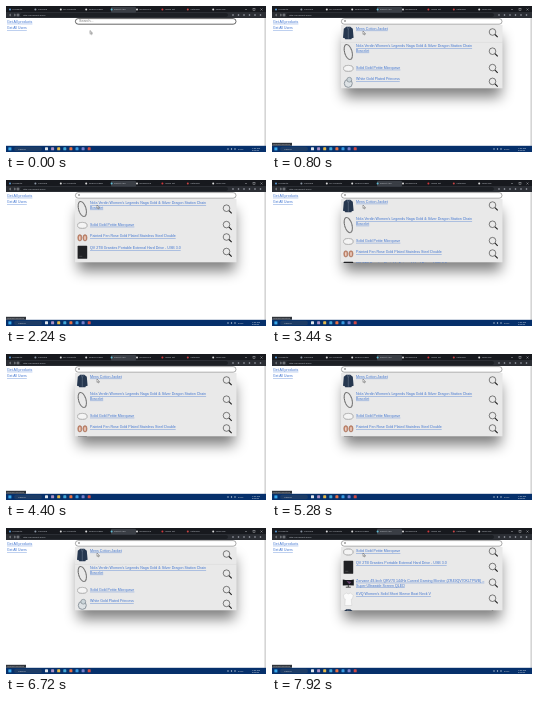
An HTML page that plays this animation: 260 by 146 pixels, repeating every 8000 ms.

```html
<!DOCTYPE html>
<html lang="en">
<head>
<meta charset="utf-8">
<title>Product search</title>
<style>
html, body { margin: 0; width: 100%; height: 100%; overflow: hidden; background: #fff; }
svg { display: block; width: 100vw; height: 100vh; }
text { font-family: "Liberation Sans", Arial, sans-serif; font-size: 3.6px; }
.link { fill: #3f74d0; text-decoration: underline; text-decoration-thickness: .3px; }
.tiny { font-size: 2.5px; fill: #b9bdc4; }
.timed { animation: 8s step-end infinite; }
.open { animation-name: open; }
#field { animation-name: field; }
#hint { animation-name: hint; }
#listA { animation-name: listA; }
#listB { animation-name: listB; }
#listC { animation-name: listC; }
#scroll { animation: scroll 8s ease-in-out infinite; }
#cursor { animation: cursor 8s ease-in-out infinite; }
@keyframes open { 0% { visibility: hidden } 3%, 100% { visibility: visible } }
@keyframes field { 0% { stroke: #333; stroke-width: .75px } 3%, 100% { stroke: #555; stroke-width: .5px } }
@keyframes hint { 0% { opacity: 1 } 3%, 100% { opacity: 0 } }
@keyframes listA { 0% { opacity: 1 } 19% { opacity: 0 } 81% { opacity: 1 } 90%, 100% { opacity: 0 } }
@keyframes listB { 0% { opacity: 0 } 19% { opacity: 1 } 81%, 100% { opacity: 0 } }
@keyframes listC { 0% { opacity: 0 } 90%, 100% { opacity: 1 } }
@keyframes scroll {
  0%, 20% { transform: translateY(0) }
  26%, 38% { transform: translateY(-17px) }
  44%, 100% { transform: translateY(0) }
}
@keyframes cursor {
  0%, 1% { transform: translate(84px, 24.5px) }
  5%, 100% { transform: translate(91px, 25px) }
}
</style>
</head>
<body>
<svg viewBox="0 0 260 146" preserveAspectRatio="none">
  <defs>
    <filter id="blur" x="-30%" y="-60%" width="160%" height="220%"><feGaussianBlur stdDeviation="7"/></filter>
    <clipPath id="window"><rect x="69" y="19" width="161.5" height="63.3"/></clipPath>
    <g id="lens" fill="none" stroke="#202020">
      <circle cx="-1" cy="-.8" r="3.3" stroke-width=".55"/>
      <path d="M1.5 1.7 4.2 4.4" stroke-width="1.1"/>
    </g>
    <g id="jacket">
      <path d="M-2-6H2L4.5-4 5.3 5 3.5 5.5 3 6.5H-3L-3.5 5.5-5.3 5-4.5-4Z" fill="#26374f"/>
      <path d="M-1.2-6 0-3 1.2-6M0-3V6" fill="none" stroke="#65758a" stroke-width=".6"/>
    </g>
    <g id="bracelet" fill="none">
      <ellipse rx="3.7" ry="7.8" transform="rotate(-16)" stroke="#555" stroke-width="1"/>
      <ellipse rx="3.7" ry="7.8" transform="rotate(-16)" stroke="#d5d5d5" stroke-width=".5" stroke-dasharray="1 .7"/>
    </g>
    <g id="ring" fill="none">
      <ellipse rx="4.8" ry="3" fill="#f4f4f4" stroke="#8d8d8d" stroke-width="1"/>
      <ellipse rx="4.7" ry="2.9" stroke="#eee" stroke-width=".5"/>
    </g>
    <g id="gem">
      <circle cy="1.2" r="4" fill="#dde2e5" stroke="#8d969d" stroke-width="1"/>
      <circle cx="1" cy="-2.5" r="2.4" fill="#cbd5da" stroke="#727d85" stroke-width=".6"/>
    </g>
    <g id="earrings" fill="#c98b70" stroke="#8a5a48" stroke-width=".4">
      <ellipse cx="-2.5" rx="2.1" ry="3.2"/><ellipse cx="2.7" rx="2.1" ry="3.2"/>
      <path d="M-2.5-1.5V2M2.7-1.5V2" stroke="#f3e2da" stroke-width="1.2"/>
    </g>
    <g id="drive">
      <rect x="-4.7" y="-6.5" width="9.6" height="13" rx=".6" fill="#202124"/>
      <path d="M-3 4H0" stroke="#777" stroke-width=".4"/>
    </g>
    <g id="monitor">
      <path d="M-5.5-3.5Q0-2.5 5.5-3.5V2.5Q0 1.8-5.5 2.5Z" fill="#17181d"/>
      <path d="M-2-2.2 3-1 1 1.2Z" fill="#68436e"/>
      <path d="M0 2V4M-2.5 4.2H2.5" stroke="#222" stroke-width=".8"/>
    </g>
    <g id="shirt">
      <path d="M-2-6Q0-4 2-6L5-4 4 0 3 0 3.5 6.5H-3.5L-3 0-4 0-5-4Z" fill="#fafafa" stroke="#c5c5c5" stroke-width=".4"/>
    </g>
  </defs>

  <rect width="260" height="146" fill="#fff"/>
  <rect x="258.4" y="12" width="1.6" height="128" fill="#d5d5d5"/>
  <text class="link" x="1" y="16.8">Get All products</text>
  <text class="link" x="1" y="23.2" style="font-size:3.4px">Get All Users</text>

  <rect class="timed open" x="72" y="30" width="157" height="61" fill="#000" opacity=".5" filter="url(#blur)"/>
  <rect id="field" class="timed" x="69.4" y="12.6" width="160.6" height="5.6" rx="2.8" fill="#fff"/>
  <text id="hint" class="timed" x="73" y="16.4" fill="#777">Search...</text>
  <text class="timed open" x="72" y="16.4" fill="#222">o</text>

  <g class="timed open">
    <rect x="69" y="19" width="161.5" height="63.3" fill="#e9e9e9"/>
    <g clip-path="url(#window)">
      <g id="listA" class="timed"><path d="M69 36.4H231" stroke="#d6d6d6" stroke-width=".5"/></g>
      <g id="listB" class="timed"><g id="scroll"></g></g>
      <g id="listC" class="timed"></g>
    </g>
  </g>

  <g id="browser">
    <rect width="260" height="6.5" fill="#17191e"/>
    <rect y="6" width="260" height="6" fill="#2b2e34"/>
    <rect x="105" y=".8" width="25" height="6" rx="1" fill="#3a3e45"/>
    <rect x="14" y="7" width="208" height="4" rx="2" fill="#1c1f24"/>
    <path d="M5 8 3.5 9 5 10M8 8 9.5 9 8 10" fill="none" stroke="#c5c8cc" stroke-width=".5"/>
    <circle cx="12" cy="9" r="1" fill="none" stroke="#c5c8cc" stroke-width=".5"/>
    <text class="tiny" x="17" y="9.9">http://localhost:3000</text>
    <path d="M239 3.5H241M254.5 2.5 256.5 4.5M256.5 2.5 254.5 4.5" stroke="#c5c8cc" stroke-width=".4"/>
    <rect x="247" y="2.5" width="2" height="2" fill="none" stroke="#c5c8cc" stroke-width=".4"/>
  </g>

  <g class="timed open">
    <rect y="136.8" width="20" height="3" fill="#30343a"/>
    <text class="tiny" x=".7" y="139" style="font-size:2px">localhost:3000/item</text>
  </g>
  <g id="taskbar">
    <rect y="139.8" width="260" height="6.2" fill="#06306b"/>
    <rect x="2.4" y="141.4" width="3" height="3" fill="#38a9ec"/>
    <rect x="8" y="140.8" width="28" height="4.4" rx="2.2" fill="#1d3c66"/>
    <text class="tiny" x="12" y="143.9">Search</text>
    <text class="tiny" x="232" y="143.9">ENG</text>
    <text class="tiny" x="246" y="142.6" style="font-size:2.2px;fill:#e4e9f0">7:34 PM</text>
    <text class="tiny" x="246" y="145.1" style="font-size:2.2px;fill:#e4e9f0">3/12/24</text>
  </g>
  <path id="cursor" d="M0 0V3.4L.9 2.7 1.5 4 2.1 3.7 1.5 2.5H2.5Z" fill="#fff" stroke="#222" stroke-width=".35"/>
</svg>
<script>
const byId = id => document.getElementById(id);
const add = (id, markup) => byId(id).insertAdjacentHTML('beforeend', markup);

const row = ([thumb, center, baseline, ...lines]) =>
  `<use href="#${thumb}" x="76.3" y="${center}"/><use href="#lens" x="221.5" y="${center}"/>` +
  lines.map((line, i) => `<text class="link" x="84" y="${baseline + i * 4.7}">${line}</text>`).join('');

const common = [
  ['jacket', 26.8, 23.7, 'Mens Cotton Jacket'],
  ['bracelet', 46, 41, "Nola Verdin Women's Legends Naga Gold &amp; Silver Dragon Station Chain", 'Bracelet'],
  ['ring', 62.4, 62.8, 'Solid Gold Petite Micropave']
];
const driveName = 'QV 2TB Granites Portable External Hard Drive - USB 3.0';
const lists = {
  listA: [...common, ['gem', 76.2, 74.4, 'White Gold Plated Princess']],
  scroll: [...common,
    ['earrings', 74.8, 74.4, 'Painted Fen Rose Gold Plated Stainless Steel Double'],
    ['drive', 89.3, 86.4, driveName]],
  listC: [
    ['ring', 24, 24, 'Solid Gold Petite Micropave'],
    ['drive', 39.3, 36.2, driveName],
    ['monitor', 55, 53.8, 'Zorvane 49-Inch QRV70 144Hz Curved Gaming Monitor (ZR49QV70KLTPWB) –', 'Super Ultrawide Screen QLED'],
    ['shirt', 71, 67.2, "KVQ Women's Solid Short Sleeve Boat Neck V"],
    ['jacket', 87.2, 84.5]
  ]
};
for (const [id, rows] of Object.entries(lists)) add(id, rows.map(row).join(''));

const tabs = ['Products', 'Console', 'My projects', 'Search page', 'React App', 'Reference', 'Video list', 'Tutorials', 'New Tab'];
const tabColors = ['#5a9bd8', '#8d98a6', '#ddd', '#ddd', '#61bfd8', '#ddd', '#d5373b', '#cc4444', '#ddd'];
tabs.forEach((label, i) => {
  const x = 4 + i * 25.4;
  add('browser', `<circle cx="${x}" cy="3.5" r="1" fill="${tabColors[i]}"/><text class="tiny" x="${x + 2.5}" y="4.4">${label}</text>`);
});
for (let i = 0; i < 6; i++) add('browser', `<circle cx="${227 + i * 5.5}" cy="9" r=".8" fill="#aab0b8"/>`);

const appColors = ['#dfe5ec', '#ac91c5', '#e5ba4a', '#44a9d8', '#ea7042', '#389ae0', '#777fcb', '#d04943'];
appColors.forEach((color, i) =>
  add('taskbar', `<rect x="${39 + i * 6.1}" y="141.3" width="3" height="3" rx=".6" fill="${color}"/>`));
for (let i = 0; i < 3; i++) add('taskbar', `<circle cx="${222 + i * 3.5}" cy="143" r=".7" fill="#c6d2e0"/>`);
</script>
</body>
</html>
```
